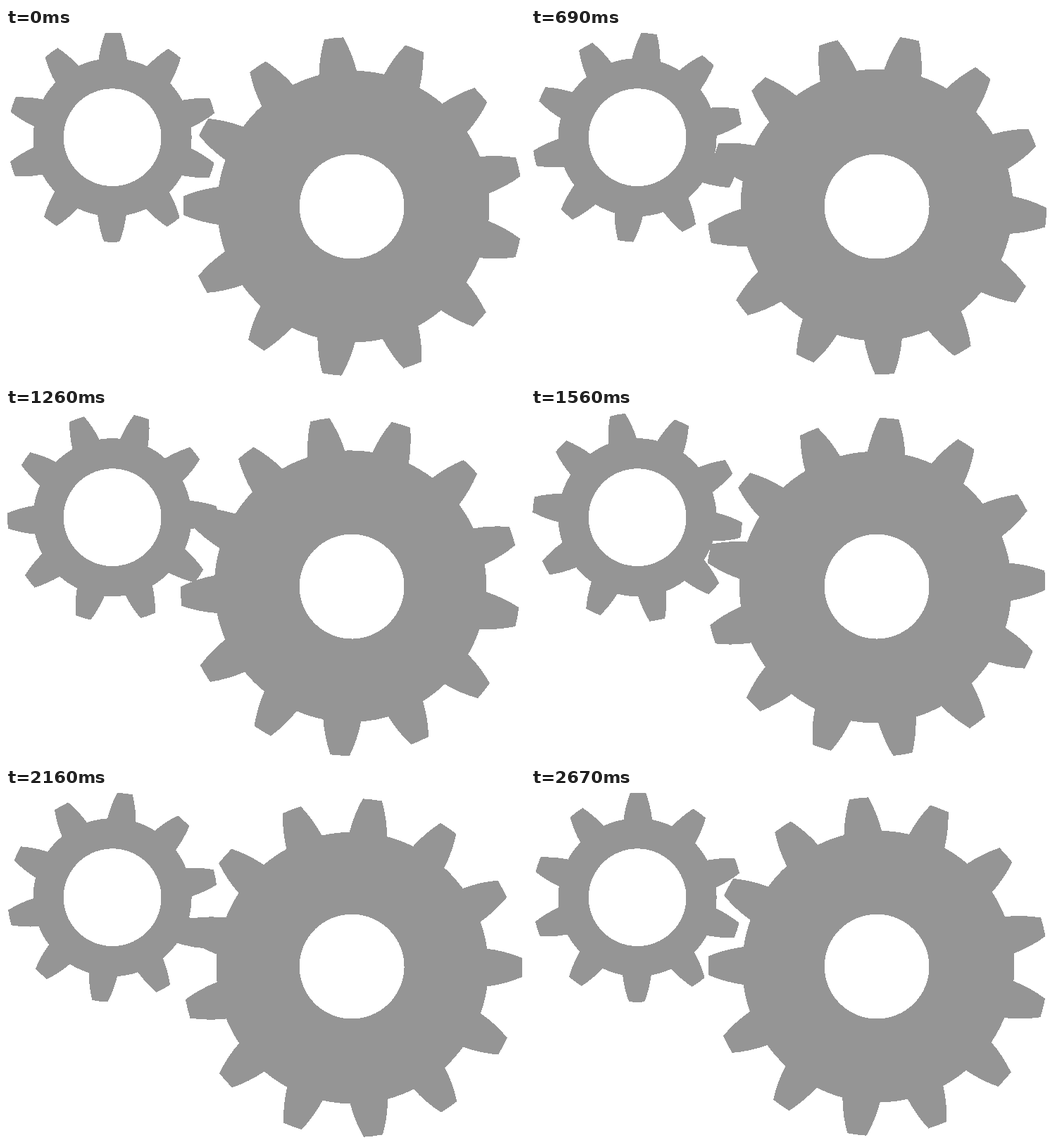
An HTML page that plays this animation: 737 by 501 pixels, repeating every 2700 ms.

```html
<!DOCTYPE html>
<html lang="en">
<head>
<meta charset="utf-8">
<title>Two gears</title>
<style>
  html, body { margin: 0; width: 100%; height: 100%; overflow: hidden; background: #fff; }
  svg { display: block; width: 737px; height: 501px; }
  path { fill: #959595; fill-rule: evenodd; shape-rendering: crispEdges; }
</style>
</head>
<body>
<svg viewBox="0 0 737 501"><path id="small"/><path id="big"/></svg>
<script>
const STEP = 30, STEPS = 90;

// Angles are in degrees, clockwise from straight up.
// root and tip are half the angular width of a tooth; shift moves the rim off the axle.
const gears = [
  { id: 'small', x: 151.1, y: 155.7, teeth: 10, phase: 0.37, turns: 2, shift: 0,
    body: 112.5, outer: 149, hole: 69.4, root: 10.4, tip: 4.25, bulge: 1.2 },
  { id: 'big', x: 491.1, y: 254.1, teeth: 13, phase: -6.6, turns: -1, shift: 2.1,
    body: 193.3, outer: 241.2, hole: 74.4, root: 8, tip: 3.25, bulge: 1.7 }
];

function outline(g) {
  const at = (r, deg) => {
    const a = deg * Math.PI / 180;
    return [g.shift + r * Math.sin(a), -r * Math.cos(a)];
  };
  const str = p => p.map(v => v.toFixed(2)).join(' ');
  const arc = (r, p) => `A${r} ${r} 0 0 1 ${str(p)}`;
  // Tooth flank from p to q, bowed outwards
  const flank = (p, q) => {
    const dx = q[0] - p[0], dy = q[1] - p[1];
    const k = 2 * g.bulge / Math.hypot(dx, dy);
    const mid = [(p[0] + q[0]) / 2 + dy * k, (p[1] + q[1]) / 2 - dx * k];
    return `Q${str(mid)} ${str(q)}`;
  };

  let d = '';
  for (let i = 0; i < g.teeth; i++) {
    const c = g.phase + i * 360 / g.teeth;
    const a = at(g.body, c - g.root), b = at(g.outer, c - g.tip);
    const e = at(g.outer, c + g.tip), f = at(g.body, c + g.root);
    d += (i ? arc(g.body, a) : 'M' + str(a)) + flank(a, b) + arc(g.outer, e) + flank(e, f);
  }
  d += arc(g.body, at(g.body, g.phase - g.root)) + 'Z';

  const h = g.hole;
  return d + `M${-h} 0A${h} ${h} 0 1 1 ${h} 0A${h} ${h} 0 1 1 ${-h} 0Z`;
}

for (const g of gears) {
  g.el = document.getElementById(g.id);
  g.el.setAttribute('d', outline(g));
}

// The last step completes the turn, so it matches the first.
function draw(ms) {
  const step = Math.floor(ms / STEP + 0.001) % STEPS;
  for (const g of gears) {
    const angle = g.turns * 360 * step / (STEPS - 1);
    g.el.setAttribute('transform', `translate(${g.x} ${g.y}) rotate(${angle})`);
  }
}

let start;
function tick(now) {
  start ??= now;
  draw(now - start);
  requestAnimationFrame(tick);
}
draw(0);
requestAnimationFrame(tick);
</script>
</body>
</html>
```
